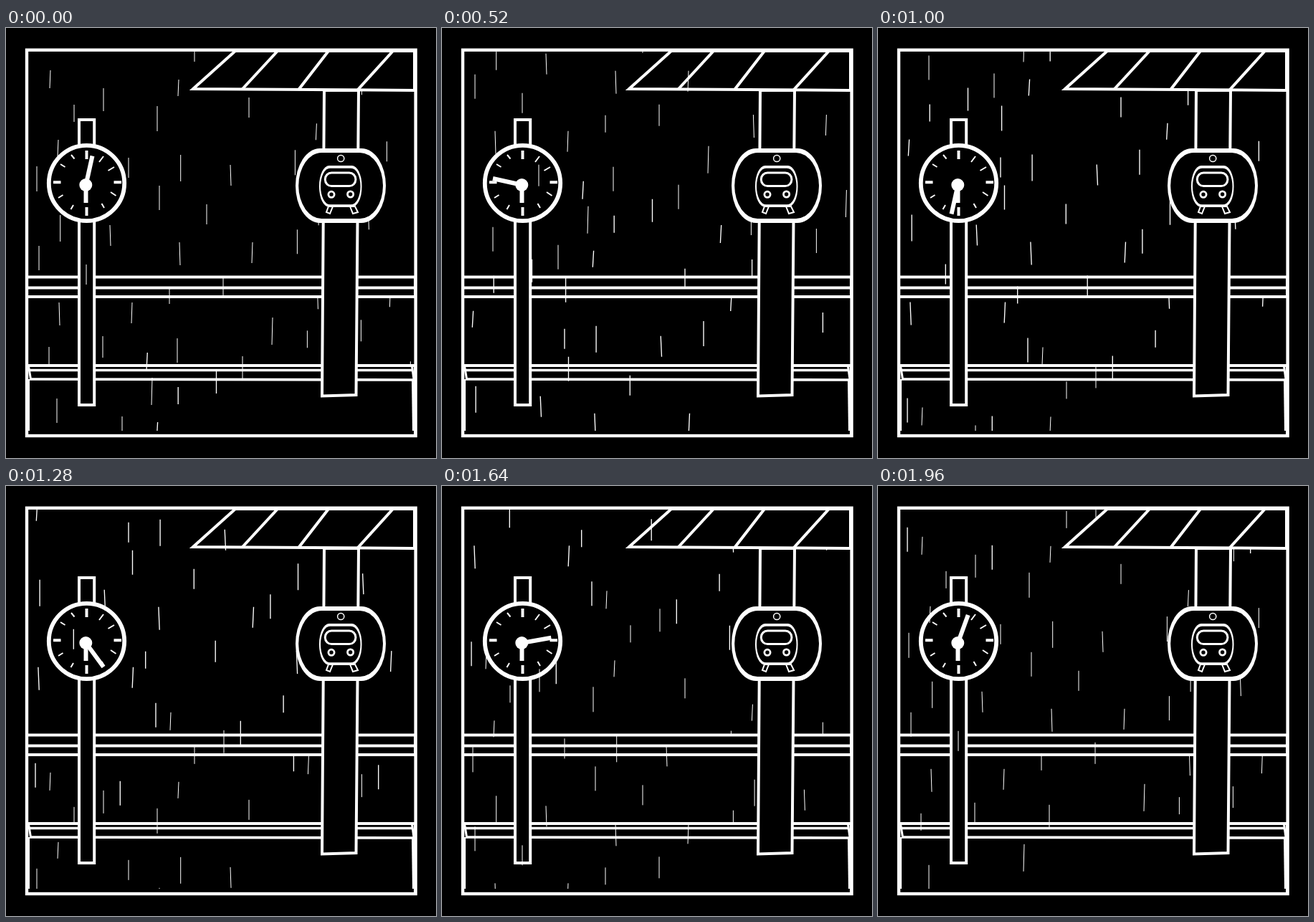
An HTML page for the animation above (2 s loop, 600 px wide and 600 px high).

```html
<!DOCTYPE html>
<html lang="en">
<head>
<meta charset="utf-8">
<title>Rainy tram stop</title>
<style>
  html, body { margin: 0; width: 100%; height: 100%; overflow: hidden; background: #000; }
  svg { display: block; width: 100vw; height: 100vh; }
  .ink { fill: #000; stroke: #fff; stroke-width: 4; }
  .bare { fill: none; }
  .rain { fill: none; stroke: #fff; stroke-width: 1; }
  .rain .near { stroke-width: 1.35; }
  .white { fill: #fff; }
</style>
</head>
<body>
<svg viewBox="0 0 600 600">
  <defs>
    <clipPath id="view"><rect x="31" y="33" width="538" height="529"/></clipPath>
  </defs>
  <rect width="600" height="600"/>

  <g clip-path="url(#view)"><g id="back" class="rain"></g></g>

  <!-- rails and platform -->
  <g class="ink">
    <path d="M29 347.5H571V375H29Z"/>
    <path d="M29 362.5H571"/>
    <path d="M29 471H571V569H29Z"/>
    <path d="M33 477.5H568M33 490L569 491" stroke-width="3.6"/>
    <path d="M31.5 472L34.5 490M566.5 472L569 490" stroke-width="3"/>
    <path d="M31 490V562M570 490L570.5 562" stroke-width="7.5" stroke="none"/>
    <path d="M31.2 490V562" stroke-width="3.6"/>
    <path d="M569 490L570 562" stroke-width="6"/>
  </g>

  <!-- shelter roof and pillar -->
  <g class="ink">
    <path d="M444 87H492L488.5 512L441 513.5Z"/>
    <path d="M261 85L320 32H570V87Z"/>
    <path d="M379 32L330 85M450 32L409 85M540 32L491 86"/>
  </g>

  <!-- tram sign -->
  <rect class="white" x="404" y="168" width="126" height="104" rx="34" ry="52"/>
  <rect x="408.2" y="174" width="117.8" height="92" rx="32" ry="46"/>
  <g class="ink">
    <circle cx="467.2" cy="182" r="4.6" stroke-width="1.5"/>
    <path d="M450 249H456L452 259L447 257ZM480 249H487L491 257L484 259Z" stroke-width="2"/>
    <rect class="white" x="437" y="192" width="59.5" height="58" rx="14" ry="28" stroke="none" style="fill:#fff;stroke:none"/>
    <rect x="439" y="195.7" width="55.5" height="50.6" rx="13" ry="25" style="stroke:none"/>
    <rect x="445.3" y="202" width="42.6" height="18.6" rx="9" stroke-width="3" style="stroke-width:3"/>
    <circle cx="454" cy="232.3" r="4.1" style="stroke-width:2.8"/>
    <circle cx="480.6" cy="232" r="4.1" style="stroke-width:2.8"/>
  </g>

  <!-- station clock -->
  <g class="ink">
    <rect x="102" y="128" width="21.2" height="398"/>
    <circle cx="112.5" cy="216.5" r="52.7" style="stroke-width:5.8"/>
    <path d="M112.5 171V183M112.5 250V262M66 215.3H76.5M150.5 215.3H161"/>
    <path d="M136 179L130 187M151 194L142.5 199M146 229L153.5 234M133.5 245L137 251M94 247L90.5 253M79.5 233L73 237M76 190L82.5 194M91 177L95.5 182.5" style="stroke-width:2"/>
    <path d="M111.5 219V244" style="stroke-width:6"/>
    <path id="hand" d="M111.5 219V177.5" style="stroke-width:6"/>
    <circle cx="111.3" cy="219" r="9" style="fill:#fff;stroke:none"/>
  </g>

  <rect class="ink bare" x="29" y="30.7" width="542.6" height="538.3" style="fill:none;stroke-width:4.4"/>
  <g clip-path="url(#view)"><g id="front" class="rain"></g></g>
</svg>
<script>
  const FRAME = 40, FRAMES = 50;
  const UNITS = 96;      // motion units in one loop
  const RISE = 9.97;     // rain travel per unit
  const SCALE = 1.3, PIVOT = 171;

  // x centre, top, length, slant
  const drops = [
    [61.5, 59, 25, -1], [136, 84, 32, 0], [95, 107, 24, 0], [72.5, 156, 23, -1],
    [171, 181, 28, 0], [43, 193, 35, 0], [75.7, 261, 37, 0], [145.5, 275, 29, 1],
    [46, 304, 34, 0], [112, 330, 28, 0], [74.5, 383, 32, 1], [175.5, 383, 29, -1],
    [135, 430, 30, 0], [60, 445, 24, 0], [203.5, 488, 38, -1], [71, 517, 34, 0],
    [162, 542, 34, 0]
  ];
  const without = x => drops.filter(d => d[0] !== x);

  // successive sheets of rain, each following the one above
  const sheets = [
    { list: drops, y: 0, scale: 1 },
    { list: without(203.5), y: 478, scale: SCALE },
    { list: without(162), y: 949, scale: 1 }
  ];

  function addRain(group, shiftX, shiftY) {
    for (const { list, y, scale } of sheets) {
      const path = document.createElementNS("http://www.w3.org/2000/svg", "path");
      path.setAttribute("d", list.map(([x, top, len, slant]) => {
        const mid = PIVOT + (x - PIVOT) * scale + shiftX;
        const half = slant * scale / 2;
        const start = top + y + shiftY;
        return `M${mid - half} ${start}L${mid + half} ${start + len}`;
      }).join(""));
      if (scale > 1) path.classList.add("near");
      group.append(path);
    }
  }

  const back = document.getElementById("back");
  const front = document.getElementById("front");
  const hand = document.getElementById("hand");

  addRain(front, 0, 0);
  addRain(front, 168, -84);
  addRain(back, 360.4, -22.7);

  const begin = performance.now();

  function draw(now) {
    const frame = Math.floor(Math.max(0, now - begin) / FRAME) % FRAMES;
    const unit = Math.floor(frame * UNITS / FRAMES);
    const move = `translate(0 ${-RISE * unit})`;
    back.setAttribute("transform", move);
    front.setAttribute("transform", move);
    hand.setAttribute("transform", `rotate(${12.5 - unit * 360 / UNITS} 111.5 219)`);
    requestAnimationFrame(draw);
  }
  draw(begin);
</script>
</body>
</html>
```
